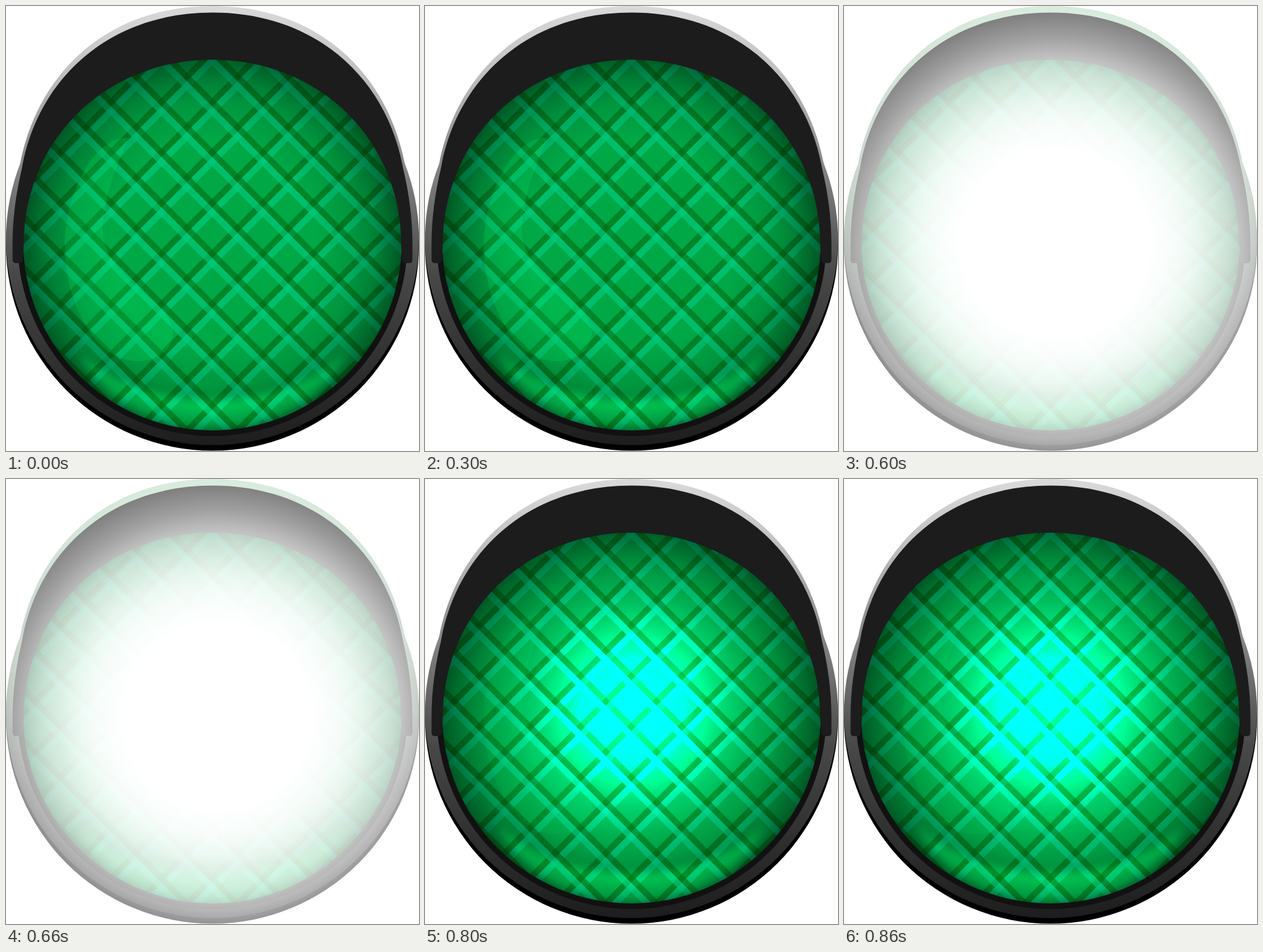
Recreate the animation shown at these times as an HTML page. Size 661 by 713 pixels, loop 900 ms.

```html
<!DOCTYPE html>
<html lang="en">
<head>
<meta charset="utf-8">
<title>Green signal lamp</title>
<style>
html, body { margin: 0; width: 661px; height: 713px; overflow: hidden; background: #fff; }
svg { display: block; }
.lens { isolation: isolate; }
.dodge { mix-blend-mode: color-dodge; }
</style>
</head>
<body>
<svg width="661" height="713" viewBox="0 0 661 713">
  <defs>
    <linearGradient id="metal" gradientUnits="userSpaceOnUse" x1="0" y1="0" x2="0" y2="713">
      <stop offset="0" stop-color="#dadada"/>
      <stop offset=".15" stop-color="#c0c0c0"/>
      <stop offset=".36" stop-color="#858585"/>
      <stop offset=".52" stop-color="#5c5c5c"/>
      <stop offset=".6" stop-color="#484848"/>
      <stop offset=".8" stop-color="#303030"/>
      <stop offset="1" stop-color="#1c1c1c"/>
    </linearGradient>
    <linearGradient id="tintFade" gradientUnits="userSpaceOnUse" x1="0" y1="0" x2="0" y2="500">
      <stop offset="0" stop-color="#96e6aa"/>
      <stop offset=".6" stop-color="#96e6aa" stop-opacity=".8"/>
      <stop offset="1" stop-color="#96e6aa" stop-opacity="0"/>
    </linearGradient>
    <radialGradient id="shade" gradientUnits="userSpaceOnUse" cx="330.5" cy="382" r="305">
      <stop offset=".55" stop-opacity="0"/>
      <stop offset=".75" stop-opacity=".11"/>
      <stop offset=".86" stop-opacity=".24"/>
      <stop offset=".94" stop-opacity=".38"/>
      <stop offset="1" stop-opacity=".5"/>
    </radialGradient>
    <radialGradient id="core" gradientUnits="userSpaceOnUse" cx="332" cy="372" r="265">
      <stop offset="0" stop-color="rgb(0,132,190)"/>
      <stop offset=".32" stop-color="rgb(0,114,180)"/>
      <stop offset=".46" stop-color="rgb(0,84,132)"/>
      <stop offset=".61" stop-color="rgb(0,46,84)"/>
      <stop offset=".78" stop-color="rgb(0,20,40)"/>
      <stop offset="1" stop-color="#000"/>
    </radialGradient>
    <radialGradient id="white" gradientUnits="userSpaceOnUse" cx="338" cy="381" r="400">
      <stop offset=".37" stop-color="#fff"/>
      <stop offset=".5" stop-color="#fff" stop-opacity=".96"/>
      <stop offset=".575" stop-color="#fff" stop-opacity=".91"/>
      <stop offset=".7" stop-color="#fff" stop-opacity=".79"/>
      <stop offset=".75" stop-color="#fff" stop-opacity=".72"/>
      <stop offset=".83" stop-color="#fff" stop-opacity=".58"/>
      <stop offset=".92" stop-color="#fff" stop-opacity=".45"/>
      <stop offset="1" stop-color="#fff" stop-opacity=".32"/>
    </radialGradient>
    <filter id="soft" x="-20%" y="-40%" width="140%" height="180%" color-interpolation-filters="sRGB">
      <feGaussianBlur stdDeviation="7"/>
    </filter>
    <clipPath id="lensClip"><circle cx="330.5" cy="377" r="303"/></clipPath>
    <g id="rim">
      <circle cx="330.5" cy="373" r="330.5"/>
      <path d="M9.500 382C9.500 340 14 297 22 257C48 112 158 0 330.500 0S613 112 639 257C647 297 651.500 340 651.500 382Z"/>
    </g>
  </defs>

  <circle cx="330.5" cy="382" r="330.5"/>
  <use href="#rim" fill="url(#metal)"/>
  <use id="tint" href="#rim" fill="url(#tintFade)" opacity="0"/>
  <circle cx="330.5" cy="377" r="312" fill="#111"/>

  <g class="lens" clip-path="url(#lensClip)">
    <rect width="661" height="713" fill="#00a846"/>
    <g id="grid" fill="none"></g>
    <rect width="661" height="713" fill="url(#shade)"/>
    <path class="dodge" filter="url(#soft)" fill="#545454"
      d="M112 552Q195 632 330 632Q466 632 549 552Q480 678 330 680Q180 678 112 552Z"/>
    <path id="gloss" fill="#00ff6e" opacity=".16"
      d="M196 212C150 205 94 290 94 385C94 470 140 569 210 569C245 569 267 550 267 522C267 470 150 440 155 350C158 300 180 250 196 212Z"/>
    <circle id="glow" class="dodge" cx="332" cy="372" r="265" fill="url(#core)" opacity="0"/>
  </g>

  <path fill="#1c1c1c" d="M10.500 382C10.500 340 16 300 25.500 260C51 116 165 10.500 330.500 10.500S610 116 635.500 260C645 300 650.500 340 650.500 382V406q0 6 -5.500 6h-5q-6 0 -6 -8L632.500 382C632.500 215 501 86 330.500 86S28.500 215 28.500 382L27 404q0 8 -6 8h-5q-5.500 0 -5.500 -6Z"/>
  <rect id="flash" width="661" height="713" fill="url(#white)" opacity="0"/>
</svg>
<script>
const $ = id => document.getElementById(id);
const PITCH = 81, LOOP = 900;

// Evenly spaced diagonals: slope -1 rises to the right, slope 1 falls.
function stripes(start, slope, color, opacity, width) {
  let d = "";
  for (let k = -12; k <= 12; k++) {
    const y = start + k * PITCH;
    d += `M0 ${y}L700 ${y + slope * 700}`;
  }
  const path = document.createElementNS("http://www.w3.org/2000/svg", "path");
  path.setAttribute("d", d);
  path.setAttribute("stroke", color);
  path.setAttribute("stroke-opacity", opacity);
  path.setAttribute("stroke-width", width);
  $("grid").append(path);
}

for (const [start, slope] of [[727, -1], [67, 1]]) {
  stripes(start, slope, "#006910", 0.56, 10);
  stripes(start + 14.5, slope, "#00cd80", 0.62, 10.5);
}

const setOpacity = (id, value) => $(id).setAttribute("opacity", value);

function update(ms) {
  const t = ms % LOOP;
  // The flash climbs and falls in hard 100 ms steps.
  const step = t < 500 ? 0 : Math.floor((t - 400) / 100);
  const flash = Math.max(0, 1 - Math.abs(step - 2) / 2);
  const lit = step >= 2;
  setOpacity("flash", flash);
  setOpacity("tint", 0.4 * flash);
  setOpacity("glow", lit ? 1 : 0);
  setOpacity("gloss", lit ? 0.06 : 0.16);
}

const begin = performance.now();
function tick() {
  update(performance.now() - begin);
  requestAnimationFrame(tick);
}
update(0);
requestAnimationFrame(tick);
</script>
</body>
</html>
```
